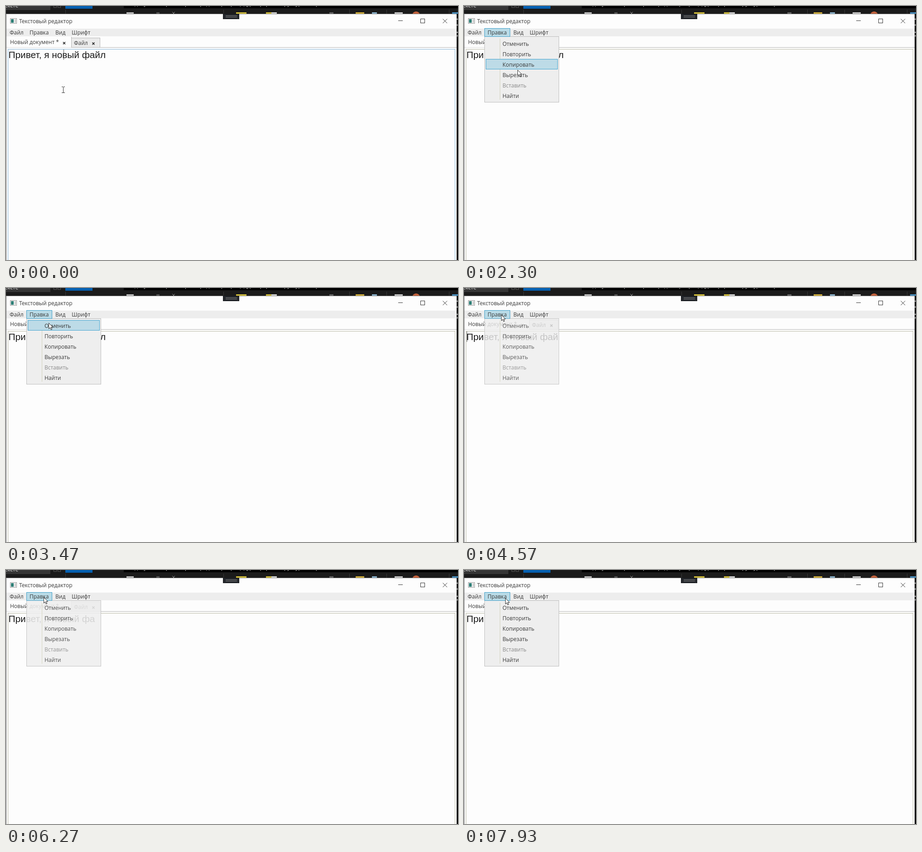
Recreate the animation shown at these times as an HTML page with a canvas. Size 998 by 561 pixels, loop 8000 ms.

```html
<!DOCTYPE html>
<html lang="ru">
<head>
<meta charset="utf-8">
<style>
  html, body { margin: 0; width: 100%; height: 100%; overflow: hidden; background: #111; }
  canvas { display: block; }
</style>
</head>
<body>
<canvas width="998" height="561"></canvas>
<script>
const ctx = document.querySelector('canvas').getContext('2d');
const LOOP = 8000, FADE = 150, ROW = 23.1, ROW_TOP = 71;
const UI = '12px "Open Sans", "Noto Sans", sans-serif';
const DOC = '20.8px "Liberation Sans", Arial, sans-serif';
const PHRASE = 'Привет, я новый файл';
const ITEMS = ['Отменить', 'Повторить', 'Копировать', 'Вырезать', 'Вставить', 'Найти'];
const DISABLED = 4;

// Menu opening and closing times; each closing is one undo.
const SESSIONS = [[1280, 3850], [4450, 5560], [6140, 6790], [7070, 9000]];

// Pointer path: time, x, y
const PATH = [
  [0, 126, 185], [250, 126, 185], [1000, 76, 57], [1370, 74, 56], [1700, 76, 58],
  [2300, 118, 141], [2750, 112, 196], [3250, 95, 81], [3470, 94, 77], [3850, 94, 80],
  [4330, 82, 59], [4700, 82, 59], [5250, 94, 86], [5500, 94, 87], [5600, 94, 87],
  [6020, 82, 59], [6300, 83, 60], [6730, 96, 73], [6800, 96, 73], [7030, 90, 61],
  [7930, 91, 62], [8000, 91, 62]
];

function rect(x, y, w, h, color) {
  ctx.fillStyle = color;
  ctx.fillRect(x, y, w, h);
}
function frame(x, y, w, h, color) {
  ctx.strokeStyle = color;
  ctx.lineWidth = 1;
  ctx.strokeRect(x + .5, y + .5, w - 1, h - 1);
}
function text(str, x, y, color = '#3a3a3a', font = UI) {
  ctx.font = font;
  ctx.fillStyle = color;
  ctx.fillText(str, x, y);
}
function cross(x, y, size, color, width) {
  ctx.strokeStyle = color;
  ctx.lineWidth = width;
  ctx.beginPath();
  ctx.moveTo(x, y); ctx.lineTo(x + size, y + size);
  ctx.moveTo(x + size, y); ctx.lineTo(x, y + size);
  ctx.stroke();
}

function pointerAt(t) {
  const i = Math.max(1, PATH.findIndex(p => p[0] >= t));
  const [t0, x0, y0] = PATH[i - 1], [t1, x1, y1] = PATH[i];
  const k = Math.max(0, (t - t0) / (t1 - t0)), e = k * k * (3 - 2 * k);
  return { x: x0 + (x1 - x0) * e, y: y0 + (y1 - y0) * e };
}

function menuAlpha(t) {
  let alpha = 0;
  for (const [open, close] of SESSIONS) {
    const shown = Math.min((t - open) / FADE, 1 - (t - close) / FADE, 1);
    alpha = Math.max(alpha, shown);
  }
  return alpha;
}

function drawDesktop() {
  rect(0, 0, 998, 561, '#1b1b1b');
  rect(260, 0, 738, 5, '#000');
  rect(0, 0, 98, 9, '#363636');
  rect(131, 0, 60, 6, '#0660b0');
  text('тексте', -9, 3, '#eee');
  text('документ  проект  файл  редактор  процедура  форма  структура  ширина', 284, -1, '#ccc');
  frame(105, -4, 7, 8, '#555');
  frame(114, -4, 7, 8, '#555');
  for (const x of [131, 480, 758, 840, 978]) rect(x, 8, 1, 9, '#393939');
  const icons = [
    [266, 16, '#c9c9c9'], [332, 7, '#555'], [508, 23, '#d9c43c'], [574, 12, '#d9c43c'],
    [586, 12, '#ddd'], [714, 9, '#666'], [772, 19, '#d9b53c'], [808, 11, '#8fb9d4'],
    [858, 18, '#d0d0d0'], [985, 13, '#4b96c8']
  ];
  for (const [x, w, color] of icons) rect(x, 14, w, 4, color);
  cross(367, 13, 6, '#999', 1);
  ctx.fillStyle = '#c5623c';
  ctx.beginPath();
  ctx.arc(905.5, 21, 9, 0, 7);
  ctx.fill();
}

function drawWindow() {
  rect(0, 17, 995, 544, '#777');
  rect(1, 18, 994, 543, '#fdfdfd');
  rect(995, 17, 3, 544, '#111');
  for (const y of [28, 41, 57, 65]) rect(995, y, 3, 2, '#aaa');

  rect(479, 17, 36, 12, '#24272c');
  frame(479, 17, 36, 12, '#17191c');
  rect(485, 21, 25, 1, '#858585');
  rect(485, 24, 25, 1, '#858585');

  rect(9, 27, 15, 12, '#f7f7f7');
  frame(9, 27, 15, 12, '#9a9a9a');
  rect(11, 29, 6, 8, '#2f7f77');
  rect(19, 29, 3, 8, '#ccc');
  text('Текстовый редактор', 29, 38);

  rect(866, 32, 10, 1, '#333');
  frame(915, 28, 10, 10, '#333');
  cross(964.5, 28.5, 9.5, '#333', 1);
}

function drawMenuBar(active) {
  rect(1, 50, 994, 17, '#ededed');
  if (active) {
    rect(45, 49, 57, 19, '#b9dbe7');
    frame(45, 49, 57, 19, '#419fc9');
  }
  text('Файл', 8, 63);
  text('Правка', 52, 63);
  text('Вид', 109, 63);
  text('Шрифт', 145, 63);
}

function drawTabs() {
  rect(144, 70, 63, 21, '#ebebeb');
  frame(144, 70, 64, 22, '#b5b5b5');
  rect(144, 91, 851, 1, '#b5b5b5');
  rect(1, 91, 143, 1, '#ddd');
  rect(144, 68, 1, 24, '#b5b5b5');
  text('Новый документ *', 9, 84);
  text('Файл', 150, 86);
  cross(126, 79.5, 5, '#222', 1.6);
  cross(190.5, 80.5, 5, '#222', 1.6);
}

function drawDocument(t, focused) {
  const undone = SESSIONS.filter(s => t >= s[1]).length;
  frame(4, 95, 988, 480, focused ? '#83b3d6' : '#b8b8a4');
  text(PHRASE.slice(0, PHRASE.length - undone), 5.6, 115, '#1a1a1a', DOC);
  const caretOn = (t + 50) % 1060 < 530;
  if (caretOn) rect(undone ? 6 : 127, 96, 1, 23, '#555');
}

function drawMenu(alpha, hover) {
  ctx.globalAlpha = alpha;
  rect(45, 67, 165, 146, '#eeeeee');
  frame(45, 67, 165, 146, '#bdbdbd');
  rect(45, 67, 57, 1, '#419fc9');
  rect(79, 72, 1, 135, '#d2d2bb');
  ITEMS.forEach((item, i) => {
    if (i === hover && i !== DISABLED) {
      const y = Math.round(ROW_TOP + i * ROW);
      rect(48, y, 159, 23, '#bddbe7');
      frame(48, y, 159, 23, '#41a3cf');
    }
    text(item, 85, 87.5 + i * ROW, i === DISABLED ? '#8a8a8a' : '#3a3a3a');
  });
  ctx.globalAlpha = 1;
}

function drawPointer({ x, y }, beam) {
  ctx.save();
  ctx.translate(Math.round(x), Math.round(y));
  if (beam) {
    rect(0, -6, 1, 13, '#333');
    for (const end of [-7, 6]) {
      rect(-3, end, 3, 1, '#333');
      rect(1, end, 3, 1, '#333');
    }
  } else {
    ctx.fillStyle = '#fff';
    ctx.strokeStyle = '#333';
    ctx.lineWidth = 1;
    ctx.stroke(ARROW);
    ctx.fill(ARROW);
    ctx.stroke(ARROW);
  }
  ctx.restore();
}
const ARROW = new Path2D('M.5 .5V13L3.5 10.3L5.6 15L7.6 14L5.6 9.5H9.5Z');

function draw(t) {
  const alpha = menuAlpha(t), pointer = pointerAt(t);
  const open = SESSIONS.some(([from, to]) => t >= from && t < to);
  const overTitle = pointer.y >= 49 && pointer.y < 68 && pointer.x > 45 && pointer.x < 102;
  const hover = Math.floor((pointerAt(Math.max(0, t - 40)).y - ROW_TOP) / ROW);
  drawDesktop();
  drawWindow();
  drawMenuBar(open || overTitle);
  drawTabs();
  drawDocument(t, !open);
  if (alpha > 0) drawMenu(alpha, hover);
  drawPointer(pointer, !open && pointer.y > 95);
}

function tick() {
  draw(performance.now() % LOOP);
  requestAnimationFrame(tick);
}
tick();
</script>
</body>
</html>
```
